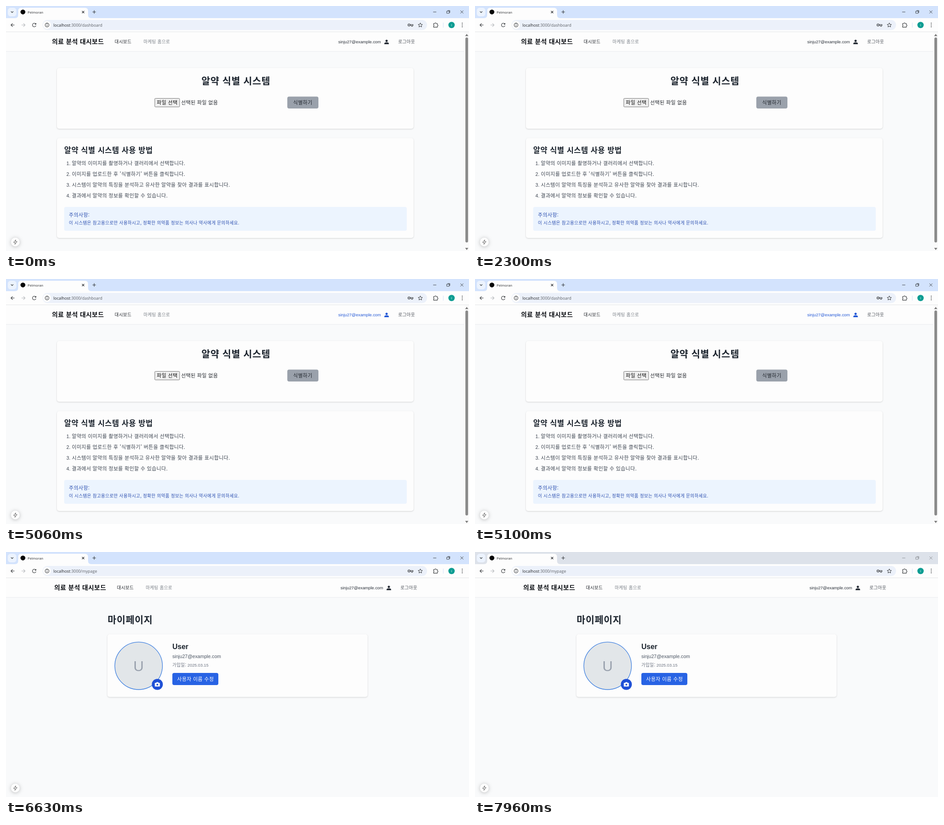
An HTML page that plays this animation: 1027x545 px, repeating every 8 s.

```html
<!DOCTYPE html>
<html lang="ko">
<head>
<meta charset="utf-8">
<style>
html, body { margin: 0; width: 100%; height: 100%; overflow: hidden; background: #f9fafb; }
svg { display: block; width: 1027px; height: 545px; }
text { white-space: pre; }
.ko { font-family: "Noto Sans CJK KR", "Noto Sans CJK", sans-serif; letter-spacing: .032em; }
.ar { font-family: "Liberation Sans", Arial, sans-serif; }
.ui { font-family: "Open Sans", "Noto Sans", sans-serif; }
.card { fill: #fdfdfd; filter: drop-shadow(0 1.5px 1.6px rgba(0, 0, 0, .16)); }
.line { fill: none; stroke: #333639; stroke-width: 1.1; }
</style>
</head>
<body>
<svg id="stage" viewBox="0 0 1027 545"></svg>
<script>
const LOOP = 8000, HOVER = 5000, LOADING = 5230, PROFILE = 5760, INACTIVE = 7000;
const EMAIL = "sinju27@example.com";

// Korean text, placed by its left edge and vertical centre
const ko = (x, cy, size, fill, str, weight = 400) =>
  `<text class="ko" x="${x}" y="${cy + size * .4}" font-size="${size * 1.05}" font-weight="${weight}" fill="${fill}">${str}</text>`;
const latin = (cls, x, y, size, fill, str, extra = "") =>
  `<text class="${cls}" x="${x}" y="${y}" font-size="${size}" fill="${fill}" ${extra}>${str}</text>`;
const rect = (x, y, w, h, r, fill, extra = "") =>
  `<rect x="${x}" y="${y}" width="${w}" height="${h}" rx="${r}" fill="${fill}" ${extra}/>`;
const circle = (x, y, r, fill, extra = "") =>
  `<circle cx="${x}" cy="${y}" r="${r}" fill="${fill}" ${extra}/>`;
const line = (d, extra = "") => `<path class="line" d="${d}" ${extra}/>`;
const card = (x, y, w, h) => rect(x, y, w, h, 5, "#fdfdfd", 'class="card"');

const tabStrip = `
  ${rect(0, 0, 1027, 40, 0, "#d3e3fd", 'id="strip"')}
  ${rect(4, 4, 19, 19, 6, "#ecf3fe")}
  ${line("M11 12l2.6 2.6 2.6-2.6")}
  <path fill="#fdfdfd" d="M20 27q7 0 7-7v-9q0-7 7-7h141q7 0 7 7v9q0 7 7 7z"/>
  ${circle(37.5, 13.3, 5.4, "#050505")}
  ${latin("ui", 48, 17.3, 7.7, "#2b2d30", "Pelmoran")}
  ${line("M168.6 11l5 5m0-5l-5 5M195.6 9.5v7.6m-3.8-3.8h7.6")}
  <g id="controls">
    ${line("M947.5 13.3h7M979 11.5h4.2v4.6H977.600v-4.600zM979.500 10h5v5M1008 10l6.500 6.500m0-6.500l-6.500 6.500", 'style="stroke-width:.9"')}
  </g>`;

const toolbar = `
  ${rect(0, 27, 1027, 31, 0, "#fdfdfd")}
  ${rect(0, 57, 1027, 1, 0, "#e3e5e8")}
  ${line("M18.800 42.300h-7.800m3.700-3.700l-3.700 3.700 3.700 3.700")}
  ${line("M34.500 42.300h7.800m-3.700-3.700l3.700 3.700-3.700 3.700", 'style="stroke:#b4b7ba"')}
  ${line("M66 40a4 4 0 1 0 .5 3.600M66.500 38v2.800h-2.800")}
  ${rect(81, 31, 853, 22.500, 11.200, "#ecf1fa")}
  ${circle(91, 42.200, 9, "#fdfdfd")}
  ${line("M95.300 42.300a4.200 4.200 0 1 0-8.400 0a4.200 4.200 0 1 0 8.400 0M91.100 41.500v3M91.100 39.600v1")}
  ${latin("ui", 105, 45.700, 8.960, "#5c6066", '<tspan fill="#222528">localhost</tspan>:3000/<tspan id="path"></tspan>')}
  ${line("M896.500 42.300a2.500 2.500 0 1 0-5 0a2.500 2.500 0 1 0 5 0M896.300 41.300h6.500v2h-1v1.700h-2.300v-1.700h-3.200")}
  ${circle(894, 42.300, .8, "#333639")}
  ${line("M919 37.700l1.400 3.100 3.400.3-2.600 2.300.8 3.300-3-1.800-3 1.800.8-3.300-2.600-2.300 3.400-.3z", 'style="stroke-width:1"')}
  ${line("M948.500 39h2.700a1.500 1.500 0 0 1 3 0h2.600v2.800a1.500 1.500 0 0 1 0 3v2.300h-8.300v-2.700a1.400 1.400 0 0 0 0-2.700z")}
  ${rect(969.500, 37, 1, 11, 0, "#d2e0f7")}
  ${circle(988.300, 42.200, 7, "#0d9c92")}
  ${latin("ui", 988.300, 45, 7.500, "#fff", "i", 'text-anchor="middle"')}
  ${[38.300, 42.300, 46.300].map(y => circle(1012, y, 1, "#333639")).join("")}`;

const header = `
  ${rect(0, 58, 1027, 43, 0, "#fdfdfd")}
  ${rect(0, 100.500, 1027, 1, 0, "#e9ebee")}
  <g id="nav">
    ${ko(102, 79, 13.330, "#080b10", "의료 분석 대시보드", 700)}
    ${ko(241, 79, 9.330, "#1f2329", "대시보드")}
    ${ko(305, 79, 9.330, "#7b8088", "마케팅 홈으로")}
    <g id="account">
      ${latin("ar", 737, 82.600, 9.330, "inherit", EMAIL)}
      <circle cx="844.200" cy="77.500" r="2.500"/>
      <path d="M839.200 85v-1.500q0-2.800 5-2.800t5 2.800v1.500z"/>
    </g>
    ${ko(870, 79, 9.330, "#4b5058", "로그아웃")}
  </g>`;

const steps = [
  "알약의 이미지를 촬영하거나 갤러리에서 선택합니다.",
  "이미지를 업로드한 후 '식별하기' 버튼을 클릭합니다.",
  "시스템이 알약의 특징을 분석하고 유사한 알약을 찾아 결과를 표시합니다.",
  "결과에서 알약의 정보를 확인할 수 있습니다."
];

const dashboard = `
  ${card(113, 138, 791, 135)}
  ${ko(433.500, 165.500, 20, "#1c242e", "알약 식별 시스템", 700)}
  ${rect(330, 205.500, 55, 19, 1.500, "#efefef", 'stroke="#777"')}
  ${ko(334.500, 214.500, 10.670, "#111", "파일 선택")}
  ${ko(388.500, 214.500, 10.670, "#22262c", "선택된 파일 없음")}
  ${rect(624, 201.500, 69, 26.500, 4, "#9aa1ab")}
  ${ko(637, 214.500, 10.670, "#23282f", "식별하기")}
  ${card(113, 294, 791, 222)}
  ${ko(129, 320.500, 16, "#1c242e", "알약 식별 시스템 사용 방법", 700)}
  ${steps.map((s, i) =>
    latin("ar", 134, 354 + 24 * i, 10.670, "#3a424e", i + 1 + ".") +
    ko(146, 350 + 24 * i, 10.670, "#3a424e", s)).join("")}
  ${rect(129, 447, 760, 53, 4, "#ecf4fe")}
  ${ko(139.500, 465, 10.670, "#2d50b0", "주의사항:")}
  ${ko(139.500, 482, 9.330, "#2d50b0", "이 시스템은 참고용으로만 사용하시고, 정확한 의약품 정보는 의사나 약사에게 문의하세요.")}
  ${rect(1017, 58, 10, 487, 0, "#fafafa")}
  ${rect(1019, 70, 6, 456, 3, "#8b8b8b")}
  <path fill="#7d7d7d" d="M1018.500 67l3.500-5 3.500 5zM1018.500 538l3.500 5 3.500-5z"/>`;

// Two opposite borders of a round box: crescents that taper to nothing
const crescent = "M-11.310-11.310A16 16 0 0 1 11.310-11.310A17.500 17.500 0 0 0-11.310-11.310z";
const loading = `
  <g id="spinner" fill="none" stroke="#4479dc">
    <path d="${crescent}" fill="#4479dc" stroke-width=".9"/>
    <path d="${crescent}" fill="#4479dc" stroke-width=".9" transform="rotate(180)"/>
  </g>
  ${ko(482, 293.500, 10.670, "#30363f", "사용자 정보 로딩 중...")}`;

const profile = `
  ${ko(225.500, 149.500, 20, "#1c242e", "마이페이지", 700)}
  ${card(225, 183, 577, 139.500)}
  ${circle(294.200, 253.200, 52.800, "#e2e6e9", 'stroke="#3f80e0" stroke-width="1.330"')}
  ${latin("ar", 294, 264.500, 32, "#9aa2ae", "U", 'text-anchor="middle"')}
  ${circle(335.700, 294.500, 12.200, "#1f50d6")}
  <path fill="#fdfdfd" d="M331 291h2l1.200-1.500h3.200l1.200 1.500h1.700q1 0 1 1v6.300q0 1-1 1h-9.300q-1 0-1-1v-6.300q0-1 1-1z"/>
  ${circle(335.700, 295, 2, "#1f50d6")}
  ${latin("ar", 369, 216, 16, "#1c242e", "User", 'font-weight="700"')}
  ${latin("ar", 369, 235.700, 10.670, "#4b5563", EMAIL)}
  ${ko(369, 251.500, 9.330, "#6b7280", "가입일:")}
  ${latin("ar", 402.500, 254.900, 9.330, "#6b7280", "2025.03.15")}
  ${rect(369, 269, 102, 27, 4, "#2863e4")}
  ${ko(379.500, 282.300, 10.670, "#fdfdfd", "사용자 이름 수정")}`;

const badge = `
  ${circle(20.700, 525, 9.700, "#fdfdfd", 'style="filter:drop-shadow(0 1px 4px rgba(0,0,0,.25))"')}
  ${line("M21.700 520l-5 6h3.700l-.7 4.300 5-6.300h-3.700z", 'style="stroke:#555;stroke-width:.9;stroke-linejoin:round"')}`;

const $ = id => document.getElementById(id);
$("stage").innerHTML = rect(0, 0, 1027, 545, 0, "#f9fafb") + tabStrip + toolbar + header +
  `<g id="dashboard">${dashboard}</g><g id="loading">${loading}</g><g id="profile">${profile}</g>` + badge;

const show = (id, on) => $(id).setAttribute("display", on ? "inline" : "none");

function draw(t) {
  const home = t < LOADING, active = t < INACTIVE;
  show("dashboard", home);
  show("loading", !home && t < PROFILE);
  show("profile", t >= PROFILE);
  $("path").textContent = home ? "dashboard" : "mypage";
  $("nav").setAttribute("transform", `translate(${home ? 0 : 5})`);
  $("account").setAttribute("fill", home && t >= HOVER ? "#2459d6" : "#2a3039");
  $("strip").setAttribute("fill", active ? "#d3e3fd" : "#dde2ea");
  $("controls").setAttribute("opacity", active ? 1 : .5);
  // the spinner stalls while the page data is fetched
  const spin = t > 5400 && t < 5660 ? 5400 : t;
  $("spinner").setAttribute("transform", `translate(458 294) rotate(${95 + (spin - 5660) * .36})`);
}

const start = performance.now();
function tick() {
  draw((performance.now() - start) % LOOP);
  requestAnimationFrame(tick);
}
tick();
</script>
</body>
</html>
```
